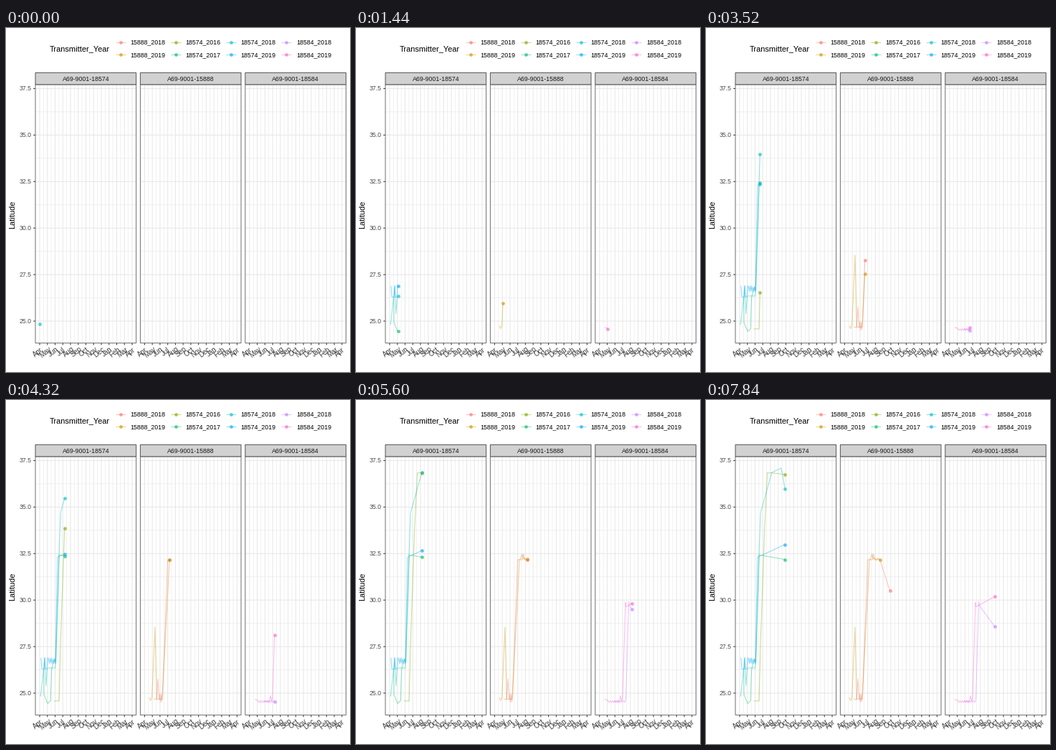
A matplotlib script that plays this animation: 480 by 480 pixels, repeating every 8000 ms.

```python
import numpy as np
import matplotlib.pyplot as plt
from matplotlib.animation import FuncAnimation
from matplotlib.patches import Rectangle

SIZE, DPI = 480, 72          # at 72 dpi one point is one pixel
FRAMES, INTERVAL = 50, 160
plt.rcParams["font.family"] = "Liberation Sans"

LEFT, WIDTH, STEP = 41.0, 140.6, 146.4
TOP, BOTTOM, STRIP = 78.9, 439.6, 62.4
GREY, GRID = "#333333", "#E8E8E8"
DAYS_PER_FRAME = 3.65
MONTHS = "Apr May Jun Jul Aug Sep Oct Nov Dec Jan Feb Mar Apr".split()
PANELS = ["18574", "15888", "18584"]
LATITUDES = np.arange(25, 38, 2.5)

rng = np.random.default_rng(4)
fig = plt.figure(figsize=(SIZE / DPI, SIZE / DPI), dpi=DPI, facecolor="white")
ax = fig.add_axes([0, 0, 1, 1])
ax.set_xlim(0, SIZE)
ax.set_ylim(SIZE, 0)
ax.axis("off")


def day_x(day):
    """Days since April 1st to pixels in the first panel."""
    return 47 + np.asarray(day) * 129 / 365


def lat_y(lat):
    return 409 - (np.asarray(lat) - 25) * 25.96


def rule(xs, ys, color=GRID, width=1.07, z=1):
    ax.plot(xs, ys, color=color, lw=width, zorder=z, snap=False,
            solid_capstyle="butt")


def label(x, y, text, size=8.8, color="black", **kw):
    kw.setdefault("va", "baseline")
    ax.text(x, y, text, fontsize=size, color=color, zorder=8, **kw)


def box(x, y, w, h, fill, edge):
    ax.add_patch(Rectangle((x, y), w, h, fc=fill, ec=edge, lw=1, zorder=6,
                           snap=False))


def draw_panel(i, tag):
    shift = i * STEP
    left, right = LEFT + shift, LEFT + shift + WIDTH
    ticks = day_x(np.linspace(0, 365, len(MONTHS))) + shift
    for x in (ticks[1:] + ticks[:-1]) / 2:
        rule([x, x], [TOP, BOTTOM], width=0.6)
    for y in lat_y(LATITUDES[:-1] + 1.25):
        rule([left, right], [y, y], width=0.6)
    for x, month in zip(ticks, MONTHS):
        rule([x, x], [TOP, BOTTOM])
        rule([x, x], [BOTTOM, BOTTOM + 2.75], GREY)
        label(x - 2.6, 452.2, month, 9.6, "#404040", rotation=38,
              ha="center", va="center")
    for y in lat_y(LATITUDES):
        rule([left, right], [y, y])
    box(left, TOP, WIDTH, BOTTOM - TOP, "none", "#707070")
    box(left, STRIP, WIDTH, TOP - STRIP, "#D1D1D1", "#555555")
    label((left + right) / 2, 74, "A69-9001-" + tag, color="#1A1A1A",
          ha="center")


for i, tag in enumerate(PANELS):
    draw_panel(i, tag)
for lat in LATITUDES:
    y = lat_y(lat)
    rule([LEFT - 2.75, LEFT], [y, y], GREY)
    label(36, y + 2.7, f"{lat:.1f}", color="#4D4D4D", ha="right")
label(9.6, 260, "Latitude", 11, rotation=90, ha="center", va="center")
label(60.5, 32.5, "Transmitter_Year", 11)


# Tracks are lists of (day, latitude)
def dwell(start, end, lat, amp, n):
    """Stay near one latitude, swinging irregularly to both sides."""
    swing = amp * rng.uniform(0.5, 1, n) * (-1) ** np.arange(n)
    return list(zip(np.linspace(start, end, n), lat + swing))


def spike(day, base, peak, half):
    return [(day - half, base), (day, peak), (day + half, base)]


def salmon_18():
    return ([(35, 24.69)] + spike(52.5, 24.65, 25.77, 5)
            + dwell(60, 71, 24.7, 0.25, 5) + [(91, 32.17)]
            + spike(114, 32.17, 32.47, 5) + [(139, 32.18), (180, 30.45)])


def gold_19():
    return (dwell(18, 29, 24.69, 0.1, 3) + [(41, 28.54), (48, 24.69),
            (69, 24.67), (98.5, 32.18)] + spike(108, 32.2, 32.47, 6)
            + dwell(118, 139, 32.2, 0.07, 4))


def olive_16():
    return [(56, 24.58), (76.4, 24.58), (83.5, 28.16), (98.5, 33.86),
            (109, 36.84), (127, 36.84), (180, 36.75)]


def green_17():
    return [(16, 26.3), (17, 24.92), (31.7, 24.44), (43, 24.6),
            (47, 26.27), (58, 26.81), (64, 26.65), (76.4, 32.43),
            (180, 32.18)]


def cyan_18():
    return [(0, 24.85), (4, 24.85), (20, 26.9), (24.6, 25.4), (30, 26.35),
            (62, 26.35), (82, 34.67), (127, 36.86), (164, 37.1),
            (180, 35.9)]


def blue_19():
    return ([(5, 26.9), (8.5, 26.3)] + spike(20, 26.3, 26.9, 2)
            + [(28, 26.3), (32, 26.9)] + dwell(35, 62, 26.73, 0.16, 10)
            + [(70, 32.3), (180, 33)])


def purple_18():
    return (dwell(57, 100, 24.55, 0.06, 10)
            + [(104, 24.68), (115.5, 29.9), (117, 29.72), (180, 28.55)])


def pink_19():
    return ([(21, 24.67)] + dwell(32, 75, 24.55, 0.06, 10)
            + spike(83, 24.57, 24.86, 4)
            + [(91, 24.73), (102.4, 29.87), (104, 29.64), (180, 30.2)])


SERIES = [
    ("15888_2018", "#F8766D", salmon_18),
    ("15888_2019", "#CD9600", gold_19),
    ("18574_2016", "#7CAE00", olive_16),
    ("18574_2017", "#00BE67", green_17),
    ("18574_2018", "#00BFC4", cyan_18),
    ("18574_2019", "#00A9FF", blue_19),
    ("18584_2018", "#C77CFF", purple_18),
    ("18584_2019", "#FF61CC", pink_19),
]


def make_line(color):
    return ax.plot([], [], color=color, lw=1.07, alpha=0.42, zorder=3,
                   solid_capstyle="butt", solid_joinstyle="round")[0]


def make_dot(color):
    return ax.plot([], [], "o", color=color, ms=4.8, mew=0, alpha=0.64,
                   zorder=4, snap=False)[0]


tracks = []
for n, (name, color, path) in enumerate(SERIES):
    cx, cy = 159.6 + 77.2 * (n // 2), 19.6 + 17.4 * (n % 2)
    make_line(color).set_data([cx - 6.9, cx + 6.9], [cy, cy])
    make_dot(color).set_data([cx], [cy])
    label(cx + 13.7, cy + 2.8, name)
    days, lats = np.array(path()).T
    shift = PANELS.index(name[:5]) * STEP
    tracks.append((days, lats, shift, make_line(color), make_dot(color)))


def update(frame):
    today = DAYS_PER_FRAME * frame
    for days, lats, shift, line, dot in tracks:
        head = min(today, days[-1])
        past = days < head
        xs = day_x(np.append(days[past], head)) + shift
        ys = lat_y(np.append(lats[past], np.interp(head, days, lats)))
        seen = today >= days[0]
        line.set_data(xs, ys)
        dot.set_data(xs[-1:], ys[-1:])
        line.set_visible(seen)
        dot.set_visible(seen)
    return [artist for track in tracks for artist in track[3:]]


anim = FuncAnimation(fig, update, frames=FRAMES, interval=INTERVAL,
                     repeat=True, repeat_delay=0, blit=False)
plt.show()
```
